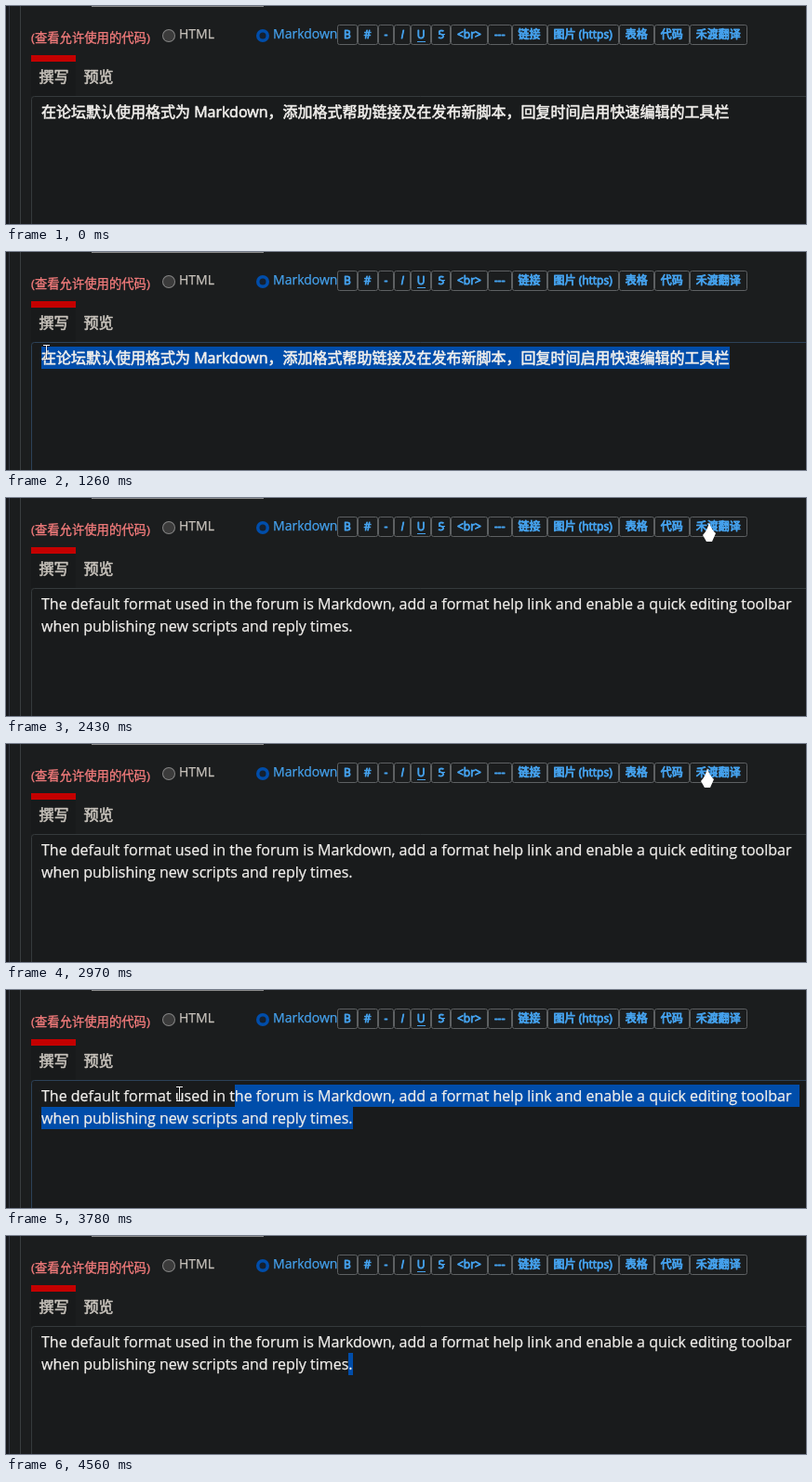
These frames come from a looping animation (860x235 px, 4590 ms). An HTML page with a canvas:

```html
<!DOCTYPE html>
<html lang="zh-CN">
<head>
<meta charset="utf-8">
<title>Markdown toolbar</title>
<style>
html, body { margin: 0; width: 100%; height: 100%; overflow: hidden; background: #1b1d1e; }
canvas { display: block; }
</style>
</head>
<body>
<canvas id="stage" width="860" height="235"></canvas>
<script>
const ctx = document.getElementById('stage').getContext('2d');
const LOOP = 4590, STEP = 30;
const FAMILY = '"Open Sans", "Noto Sans CJK SC", sans-serif';
const LEFT = 38, TOP = 102, LINE = 24;
const BLUE = '#004daa', LINK = '#45a2ee', PALE = '#c8c3bc', WHITE = '#f1efec';

const CHINESE = ['在论坛默认使用格式为 Markdown，添加格式帮助链接及在发布新脚本，回复时间启用快速编辑的工具栏'];
const ENGLISH = [
  'The default format used in the forum is Markdown, add a format help link and enable a quick editing toolbar ',
  'when publishing new scripts and reply times.'
];
const LABELS = ['B', '#', '-', 'I', 'U', 'S', '<br>', '---', '链接', '图片 (https)', '表格', '代码', '禾渡翻译'];

const linear = f => f;
const easeOut = f => 1 - (1 - f) ** 3;
const smooth = f => f * f * (3 - 2 * f);

// Pointer gestures, each going on from where the last one ended
const ENTRY = { x: 836, y: 63 };
const MOVES = [
  { from: 180, to: 600, x: 800, y: 113, ease: easeOut },
  { from: 930, to: 1230, x: 43, y: 108, ease: smooth },
  { from: 1470, to: 1920, x: 756, y: 37, ease: smooth },
  { from: 2940, to: 2970, x: 754, y: 37, ease: linear },
  { from: 2970, to: 3180, x: 470, y: 140, ease: smooth },
  { from: 3180, to: 3390, x: 222, y: 112, ease: linear },
  { from: 3390, to: 3480, x: 248, y: 112, ease: smooth },
  { from: 3750, to: 3855, x: 30, y: 112, ease: linear },
  { from: 3855, to: 4170, x: 529, y: 154, ease: linear },
  { from: 4170, to: 4350, x: 748, y: 154, ease: easeOut }
];

function pointer(t) {
  let { x, y } = ENTRY;
  for (const m of MOVES) {
    if (t <= m.from) break;
    const f = m.ease(Math.min(1, (t - m.from) / (m.to - m.from)));
    x += (m.x - x) * f;
    y += (m.y - y) * f;
  }
  return { x, y };
}

function rect(x, y, w, h, color) {
  ctx.fillStyle = color;
  ctx.fillRect(x, y, w, h);
}

function outline(x, y, w, h, r, color) {
  ctx.beginPath();
  ctx.roundRect(x + 0.5, y + 0.5, w - 1, h - 1, r);
  ctx.strokeStyle = color;
  ctx.lineWidth = 1;
  ctx.stroke();
}

function disc(x, y, r, color) {
  ctx.fillStyle = color;
  ctx.beginPath();
  ctx.arc(x, y, r, 0, Math.PI * 2);
  ctx.fill();
}

function setFont(size, style = '') {
  ctx.font = `${style} ${size}px ${FAMILY}`;
}

// Letters are thickened with a thin stroke, ideographs a little more
function text(str, x, y, size, color, { style, heavy = 0 } = {}) {
  setFont(size, style);
  ctx.fillStyle = ctx.strokeStyle = color;
  ctx.lineJoin = 'round';
  ctx.lineWidth = heavy || (/[\u4e00-\u9fff]/.test(str) ? 0.6 : 0.25);
  ctx.fillText(str, x, y);
  ctx.strokeText(str, x, y);
}

function drawToolbar() {
  let x = 356;
  for (const label of LABELS) {
    const style = label === 'I' ? 'italic' : '';
    setFont(12, style);
    const width = ctx.measureText(label).width, next = x + width + 14;
    const edge = Math.round(x), mid = x + 7 + width / 2;
    outline(edge, 20, Math.round(next) - edge, 22, 2, '#5d6062');
    text(label, x + 7, 35, 12, LINK, { style, heavy: 0.85 });
    if (label === 'U') rect(Math.round(mid) - 4, 38, 9, 1, LINK);
    if (label === 'S') rect(Math.round(mid) - 3, 30, 7, 1, LINK);
    x = next;
  }
}

function drawPage(focused) {
  rect(0, 0, 860, 235, '#1b1d1e');
  rect(0, 0, 3, 235, '#17191d');
  rect(3, 0, 1, 235, '#303641');
  rect(15, 0, 1, 235, '#393d40');
  rect(92, 0, 185, 1, '#8b8b8b');

  text('(查看允许使用的代码)', 27, 39, 13.333, '#f47c7c', { heavy: 0.3 });
  disc(175, 32, 7, '#858585');
  disc(175, 32, 6, '#3b3b3b');
  text('HTML', 186, 35, 14, PALE);
  disc(276, 32, 7, BLUE);
  disc(276, 32, 3.5, '#15202e');
  text('Markdown', 287, 35, 14, LINK);
  drawToolbar();

  rect(27, 53, 48, 44, '#181a1b');
  rect(27, 53, 48, 7, '#c40000');
  text('撰写', 35.5, 82, 16, PALE);
  text('预览', 83.5, 82, 16, PALE);

  rect(28, 98, 832, 137, '#191b1c');
  outline(27, 97, 860, 200, 3, focused ? '#2c4258' : '#353a3c');
}

// Nearest character boundary to x
function snap(line, x) {
  let prev = 0;
  for (let i = 1; i <= line.length; i++) {
    const w = ctx.measureText(line.slice(0, i)).width;
    if (x - LEFT < (prev + w) / 2) break;
    prev = w;
  }
  return LEFT + prev;
}

// Highlight from the pointer to the end of the text
function drawSelection(lines, { x, y }) {
  setFont(16);
  const last = lines.length - 1;
  const first = y < TOP + LINE ? 0 : last;
  for (let i = first; i <= last; i++) {
    const from = Math.round(i === first ? snap(lines[i], x) : LEFT);
    const lineBreak = i < last ? 4 : 0;
    const to = Math.round(LEFT + ctx.measureText(lines[i]).width + lineBreak);
    rect(from, TOP + i * LINE, to - from, LINE, BLUE);
  }
}

function drawBeam(x, y) {
  ctx.beginPath();
  ctx.moveTo(x + 0.5, y - 7);
  ctx.lineTo(x + 0.5, y + 7);
  for (const dy of [-7.5, 7.5]) {
    ctx.moveTo(x - 3, y + dy);
    ctx.lineTo(x + 4, y + dy);
  }
  for (const [width, color] of [[2, 'rgba(0,0,0,.55)'], [1, '#f4f4f4']]) {
    ctx.lineWidth = width;
    ctx.strokeStyle = color;
    ctx.stroke();
  }
}

function drawHand(x, y) {
  ctx.fillStyle = '#fff';
  ctx.beginPath();
  ctx.moveTo(x, y - 11);
  ctx.quadraticCurveTo(x + 2, y - 3, x + 7, y + 1);
  ctx.lineTo(x + 3, y + 10);
  ctx.lineTo(x - 3, y + 10);
  ctx.lineTo(x - 7, y + 3);
  ctx.quadraticCurveTo(x - 2, y - 2, x, y - 11);
  ctx.fill();
}

function drawArrow(x, y) {
  ctx.fillStyle = '#fff';
  ctx.beginPath();
  ctx.moveTo(x, y - 8);
  ctx.lineTo(x, y + 7);
  ctx.lineTo(x + 4, y + 4);
  ctx.lineTo(x + 10, y + 3);
  ctx.fill();
}

function drawPointer({ x, y }) {
  x = Math.round(x);
  y = Math.round(y);
  if (y > 97) drawBeam(x, y);
  else if (y < 42) drawHand(x, y);
  else drawArrow(x, y);
}

function draw(t) {
  const within = (from, to) => t >= from && t < to;
  const lines = t < 2400 ? CHINESE : ENGLISH;
  drawPage(within(270, 2280) || within(3180, 4560));

  // The highlight trails the pointer by one step, until the button is released
  if (within(960, 2400)) drawSelection(lines, pointer(Math.min(t - STEP, 1260)));
  if (t >= 3210) drawSelection(lines, pointer(Math.min(t - STEP, 4068)));

  lines.forEach((line, i) => text(line, LEFT, TOP + 18 + i * LINE, 16, WHITE));
  if (within(270, 780)) rect(778, 103, 1, 22, WHITE);
  if (within(180, 4560)) drawPointer(pointer(t));
}

const start = performance.now();
function tick() {
  const t = (performance.now() - start) % LOOP;
  draw(Math.floor(t / STEP) * STEP);
  requestAnimationFrame(tick);
}
tick();
</script>
</body>
</html>
```
